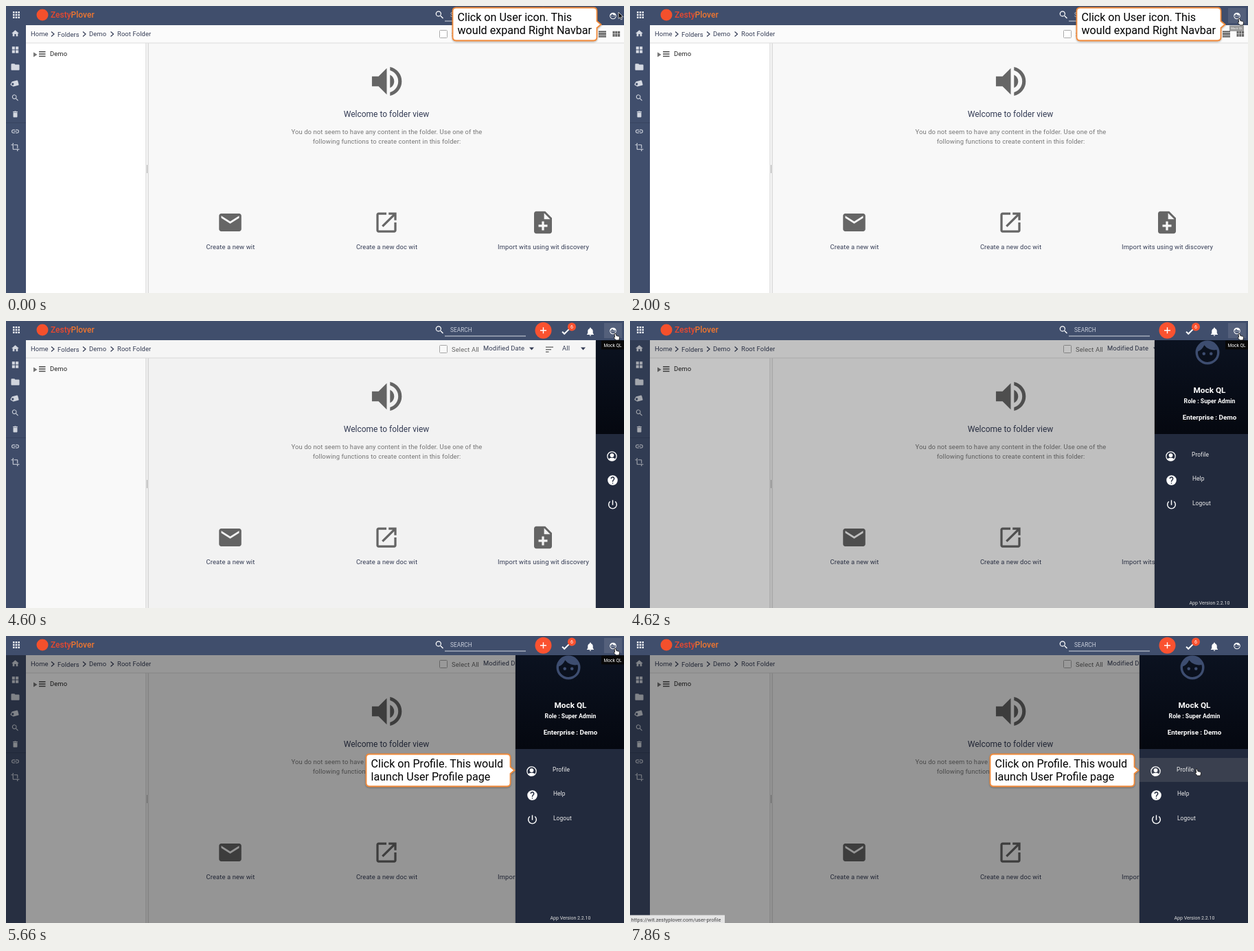
An HTML page that plays this animation: 900x419 px, repeating every 8000 ms.

```html
<!DOCTYPE html>
<html lang="en">
<head>
<meta charset="utf-8">
<title>Opening the user profile</title>
<style>
  html, body { margin: 0; width: 100%; height: 100%; overflow: hidden; background: #f8f8f8; }
  svg { display: block; width: 100%; height: 100%; font-family: Roboto, sans-serif; }
  .label { font-size: 9.4px; letter-spacing: .12px; }
  .mid { text-anchor: middle; }
  .callout { font-size: 16.1px; fill: #000; }
</style>
</head>
<body>
<svg id="stage" viewBox="0 0 900 419"></svg>
<script>
const LOOP = 8000, NAVY = '#404e6c', INK = '#343c55', GRAY = '#666';

// Icon outlines on a 24-unit grid
const ICONS = {
  apps: 'M4 4h4v4H4zm6 0h4v4h-4zm6 0h4v4h-4zM4 10h4v4H4zm6 0h4v4h-4zm6 0h4v4h-4zM4 16h4v4H4zm6 0h4v4h-4zm6 0h4v4h-4z',
  home: 'M10 20v-6h4v6h5v-8h3L12 3 2 12h3v8z',
  blocks: 'M3 3h8v8H3zm10 0h8v8h-8zM3 13h8v8H3zm10 0h8v8h-8z',
  folder: 'M10 4H4c-1.1 0-2 .9-2 2v12c0 1.1.9 2 2 2h16c1.1 0 2-.9 2-2V8c0-1.1-.9-2-2-2h-8z',
  tag: 'M21.4 11.6l-9-9C12 2.2 11.5 2 11 2H4c-1.1 0-2 .9-2 2v7c0 .5.2 1 .6 1.4l9 9c.8.8 2 .8 2.8 0l7-7c.8-.8.8-2 0-2.8zM7 10a3 3 0 1 1 0-6 3 3 0 0 1 0 6z',
  search: 'M15.5 14h-.8l-.3-.3A6.5 6.5 0 1 0 13.7 14.4l.3.3v.8l5 5 1.5-1.5zm-6 0a4.5 4.5 0 1 1 0-9 4.5 4.5 0 0 1 0 9z',
  trash: 'M6 19c0 1.1.9 2 2 2h8c1.1 0 2-.9 2-2V7H6zM19 4h-3.5l-1-1h-5l-1 1H5v2h14z',
  link: 'M3.9 12A3.1 3.1 0 0 1 7 8.9h4V7H7a5 5 0 0 0 0 10h4v-1.9H7A3.1 3.1 0 0 1 3.9 12zM8 13h8v-2H8zm9-6h-4v1.9h4a3.1 3.1 0 0 1 0 6.2h-4V17h4a5 5 0 0 0 0-10z',
  crop: 'M17 15h2V7c0-1.1-.9-2-2-2H9v2h8zM7 17V1H5v4H1v2h4v10c0 1.1.9 2 2 2h10v4h2v-4h4v-2z',
  speaker: 'M3 9v6h4l5 5V4L7 9zm13.5 3A4.5 4.5 0 0 0 14 8v8c1.5-.7 2.5-2.2 2.5-4zM14 3.2v2.1a7 7 0 0 1 0 13.4v2.1a9 9 0 0 0 0-17.6z',
  mail: 'M20 4H4c-1.1 0-2 .9-2 2v12c0 1.1.9 2 2 2h16c1.1 0 2-.9 2-2V6c0-1.1-.9-2-2-2zm0 4l-8 5-8-5V6l8 5 8-5z',
  open: 'M19 19H5V5h7V3H5c-1.1 0-2 .9-2 2v14c0 1.1.9 2 2 2h14c1.1 0 2-.9 2-2v-7h-2zM14 3v2h3.6l-9.8 9.8 1.4 1.4L19 6.4V10h2V3z',
  noteAdd: 'M14 2H6c-1.1 0-2 .9-2 2v16c0 1.1.9 2 2 2h12c1.1 0 2-.9 2-2V8zm2 14h-3v3h-2v-3H8v-2h3v-3h2v3h3zm-3-7V3.5L18.5 9z',
  bell: 'M12 22a2 2 0 0 0 2-2h-4c0 1.1.9 2 2 2zm6-6v-5c0-3.1-1.6-5.6-4.5-6.3V4a1.5 1.5 0 0 0-3 0v.7C7.6 5.4 6 7.9 6 11v5l-2 2v1h16v-1z',
  check: 'M9 15L5 11l-2.4 2.4L9 19.8 22 6.800l-2.400-2.400z',
  face: 'M9 11.700a1.300 1.300 0 1 0 0 2.600 1.300 1.300 0 0 0 0-2.600zm6 0a1.300 1.300 0 1 0 0 2.600 1.300 1.300 0 0 0 0-2.600zM12 2a10 10 0 1 0 0 20 10 10 0 0 0 0-20zm0 18a8 8 0 0 1-8-8.900 10 10 0 0 0 5.300-5.300A10 10 0 0 0 19.700 9.700 8 8 0 0 1 12 20z',
  person: 'M12 2a10 10 0 1 0 0 20 10 10 0 0 0 0-20zm0 1.800a8.200 8.200 0 0 1 6.200 13.500C16.500 15.500 14 15 12 15s-4.500.5-6.200 2.300A8.200 8.200 0 0 1 12 3.800zM12 6a4 4 0 1 1 0 8 4 4 0 0 1 0-8z',
  help: 'M12 2a10 10 0 1 0 0 20 10 10 0 0 0 0-20zm1 17h-2v-2h2zm2-7.700l-.9.900C13.400 12.900 13 13.500 13 15h-2v-.5c0-1.100.5-2.100 1.200-2.800l1.200-1.300A2 2 0 1 0 10 9H8a4 4 0 1 1 7 2.300z',
  power: 'M13 3h-2v10h2zm4.800 2.200l-1.400 1.400a7 7 0 1 1-8.800 0L6.200 5.200a9 9 0 1 0 11.600 0z',
  modules: 'M4 5h5v6H4zm6 0h5v6h-5zm6 0h5v6h-5zM4 12h5v6H4zm6 0h5v6h-5zm6 0h5v6h-5z'
};

const icon = (name, cx, cy, size, fill, turn = 0) =>
  `<path d="${ICONS[name]}" fill="${fill}" fill-rule="evenodd" transform="translate(${cx} ${cy}) rotate(${turn}) scale(${size / 24}) translate(-12 -12)"/>`;
const rect = (x, y, w, h, fill, extra = '') =>
  `<rect x="${x}" y="${y}" width="${w}" height="${h}" fill="${fill}" ${extra}/>`;
const text = (x, y, s, fill = INK, extra = 'class="label"') =>
  `<text x="${x}" y="${y}" fill="${fill}" ${extra}>${s}</text>`;
const centered = (x, y, s, size, fill, weight = 400) =>
  text(x, y, s, fill, `class="mid" font-size="${size}" font-weight="${weight}"`);
const bars = (x, y, w, count, gap, fill) =>
  Array.from({ length: count }, (_, i) => rect(x, y + i * gap, w, 1.6, fill)).join('');
const chevron = x => `<path d="M${x - 2} 37.500l4 3.500-4 3.500" fill="none" stroke="${INK}" stroke-width="1.200"/>`;
const dropArrow = x => `<path d="M${x} 38.500h7l-3.500 4z" fill="${INK}"/>`;

// Rounded box with a small tail on its right side
const callout = (id, x, y, w, h, tailY, lines) => `<g id="${id}">
  <path d="M${x + 5} ${y}h${w - 10}q5 0 5 5V${tailY - 5}l6 5-6 5V${y + h - 5}q0 5-5 5h${10 - w}q-5 0-5-5V${y + 5}q0-5 5-5z"
    fill="#fff" stroke="#f08a3a" stroke-width="1.800" filter="url(#shadow)"/>
  ${lines.map((s, i) => text(x + 7, y + 19.500 + i * 18.500, s, '#000', 'class="callout"')).join('')}</g>`;

const sidebar = [['home', 40, 13], ['blocks', 64, 12.5], ['folder', 89, 14.5], ['tag', 113, 13, -60],
  ['search', 134, 12.5], ['trash', 158, 12], ['link', 183, 13], ['crop', 206, 13]]
  .map(([name, y, size, turn]) => icon(name, 13.5, y, size, '#d5d9e2', turn)).join('');

const page = `
  ${rect(0, 0, 900, 419, '#f8f8f8')}
  ${rect(29, 28, 871, 26, '#fbfbfb')}${rect(29, 54, 175, 365, '#fff')}
  ${rect(203.500, 54, 4, 365, '#f1f1f1')}${rect(203, 54, 1, 365, '#e2e2e2')}${rect(207, 54, 1, 365, '#d8d8d8')}
  ${rect(29, 53.500, 871, 1, '#dedede')}${rect(205, 232, 1, 12, '#aaa')}
  ${rect(0, 28, 29, 391, NAVY)}${rect(0, 170, 29, 1, '#374460')}${sidebar}
  ${text(36, 43.500, 'Home')}${chevron(68)}${text(75, 44.500, 'Folders')}${chevron(114)}
  ${text(121, 43.500, 'Demo')}${chevron(154.500)}${text(162, 43.500, 'Root Folder')}
  ${rect(631.500, 35.500, 11, 11, '#fff', 'stroke="#aaa" rx="1"')}
  ${text(649, 44.500, 'Select All', '#666')}${text(695, 43, 'Modified Date')}${dropArrow(762)}
  ${rect(786, 37.500, 11, 1.300, GRAY)}${rect(786, 41, 8, 1.300, GRAY)}${rect(786, 44.500, 4.500, 1.300, GRAY)}
  ${text(810, 43, 'All')}${dropArrow(837)}
  ${bars(863, 36.500, 11, 4, 2.500, '#444')}${icon('modules', 888.500, 41, 15, GRAY)}
  <path d="M40 67.500l5.500 3.500-5.500 3.500z" fill="#777"/>${bars(48, 66, 9.500, 3, 3.300, '#555')}${text(64, 73, 'Demo', '#222')}
  ${icon('speaker', 554.500, 110, 57.500, GRAY)}
  ${centered(554, 161.500, 'Welcome to folder view', 12, INK)}
  ${text(554.500, 187, 'You do not seem to have any content in the folder. Use one of the', '#777', 'class="label mid"')}
  ${text(554.500, 201, 'following functions to create content in this folder:', '#777', 'class="label mid"')}
  ${[['mail', 326.500, 'Create a new wit'], ['open', 554, 'Create a new doc wit'], ['noteAdd', 782, 'Import wits using wit discovery']]
    .map(([name, x, s]) => icon(name, x, 316, 39, GRAY) + text(x + .5, 354.500, s, INK, 'class="label mid"')).join('')}`;

// Panel coordinates are relative to its left edge
const panel = `<g id="panel">
  ${rect(0, 28, 160, 391, '#242b3c', 'filter="url(#shadow)"')}${rect(0, 28, 160, 137, 'url(#night)')}
  ${rect(0, 178, 160, 35, '#3a404f', 'id="rowHover"')}
  ${icon('face', 77, 46, 42, '#3d4d70')}
  ${centered(80, 105, 'Mock QL', 11.800, '#fff', 700)}
  ${centered(80, 119.500, 'Role : Super Admin', 8.700, '#fff', 700)}
  ${centered(80, 144, 'Enterprise : Demo', 9.800, '#fff', 700)}
  ${[['person', 23.500, 197.500, 'Profile', 54], ['help', 24.500, 232.500, 'Help', 55], ['power', 24.500, 268, 'Logout', 55]]
    .map(([name, x, y, s, tx], i) => icon(name, x, y, 17.500, '#fff')
      + text(tx, 197.500 + i * 35.700, s, '#eee', 'font-size="8.400" letter-spacing=".1"')).join('')}
  ${centered(80, 414, 'App Version 2.2.10', 7, '#ddd')}</g>`;

const header = `
  ${rect(0, 0, 900, 28, NAVY)}${icon('apps', 15, 13, 15, '#eef0f4')}
  <circle cx="53" cy="13" r="8.500" fill="#f4502c"/>
  <text x="65" y="17" font-size="12" font-weight="500" fill="#e8482f">Zesty<tspan fill="#f0762f">Plover</tspan></text>
  ${icon('search', 631.500, 13, 15.500, '#fff')}${text(647, 15.500, 'SEARCH', '#c8cedb', 'font-size="8.400"')}
  ${rect(639, 21.500, 118, 1, '#d5d9e2')}
  <circle cx="782.500" cy="13.800" r="12" fill="#fa5230"/><path d="M778 13.800h9m-4.500-4.500v9" stroke="#fff" stroke-width="1.400"/>
  ${icon('check', 815, 15.500, 14.500, '#fff')}<circle cx="824" cy="8.500" r="6" fill="#fa5230"/>${centered(824, 11, '6', 7, '#fff')}
  ${icon('bell', 851, 15.500, 15, '#fff')}
  ${rect(871, 3, 26, 22, 'rgba(255,255,255,.1)', 'id="buttonHover"')}${icon('face', 884, 14.500, 11.500, '#fff')}`;

const stage = document.getElementById('stage');
stage.innerHTML = `
  <defs>
    <filter id="shadow" x="-10%" y="-20%" width="120%" height="150%"><feDropShadow dx="0" dy="1" stdDeviation="1.200" flood-opacity=".35"/></filter>
    <linearGradient id="night" x2="0" y2="1"><stop stop-color="#0b1220"/><stop offset="1" stop-color="#050810"/></linearGradient>
  </defs>
  ${page}${rect(0, 28, 900, 391, '#000', 'id="shade"')}${panel}${header}
  <g id="tooltip">${rect(-16.500, 0, 33, 13, '#080808', 'rx="1"')}${centered(0, 9, 'Mock QL', 6.600, '#fff')}</g>
  ${callout('userTip', 650.500, 2.500, 210, 48, 27, ['Click on User icon. This', 'would expand Right Navbar'])}
  ${callout('profileTip', 524.500, 172.500, 210, 47, 196, ['Click on Profile. This would', 'launch User Profile page'])}
  <g id="status">${rect(0, 407.500, 138, 12, '#e4e4e4')}${text(1.500, 417, 'https://wit.zestyplover.com/user-profile', '#444', 'font-size="7.500"')}</g>
  <g id="pointer" stroke-linejoin="round">
    <path id="arrow" d="M0 0v9.500l2.200-2 1.500 3.400 1.600-.7-1.500-3.300h3z" fill="#111" stroke="#fff" stroke-width=".7"/>
    <path id="hand" d="M-1 .6Q0-.8 1 .6L2 3.600 5.400 4.300Q6.600 4.800 6.500 6.500L5.800 10H1.500L-1.800 6.800Q-2 5.300-.4 5.700z" fill="#fff" stroke="#111" stroke-width=".9"/>
  </g>`;

const el = id => document.getElementById(id);
const show = (id, on) => el(id).setAttribute('visibility', on ? 'visible' : 'hidden');
const place = (id, value) => el(id).setAttribute('transform', value);
const progress = (t, from, to) => Math.min(1, Math.max(0, (t - from) / (to - from)));
const smooth = p => p * p * (3 - 2 * p);

function recordedTime(t) {
  if (t < 4600) return Math.floor(t / 200) * 200;
  if (t < 4660) return 4600 + Math.floor((t - 4600) / 20) * 20;
  return 4660 + Math.floor((t - 4660) / 200) * 200;
}

function draw(t) {
  const slide = t < 4600 ? -1 : Math.min(3, Math.round((t - 4600) / 20));
  show('panel', slide >= 0);
  place('panel', `translate(${[859, 764, 746, 742][slide] ?? 900} 0)`);
  el('shade').setAttribute('opacity', [.025, .23, .36, .4][slide] ?? 0);

  show('userTip', t < 4600);
  show('profileTip', t >= 4660);

  const onUser = t >= 1800 && t < 6260, onProfile = t >= 7460;
  show('buttonHover', onUser);
  show('rowHover', onProfile);
  show('status', t >= 7660);

  const opening = t < 2200;
  show('tooltip', t >= 2000 && t < 6460);
  place('tooltip', `translate(883.500 28.500) scale(${opening ? .64 : 1})`);
  el('tooltip').setAttribute('opacity', opening ? .4 : 1);

  const approach = smooth(progress(t, 200, 1800)), leave = smooth(progress(t, 6060, 7460));
  place('pointer', `translate(${892 - 5 * approach - 62 * leave} ${9 + 9 * approach + 176 * leave})`);
  show('hand', onUser || onProfile);
  show('arrow', !onUser && !onProfile);
}

function tick() {
  draw(recordedTime(performance.now() % LOOP));
  requestAnimationFrame(tick);
}
tick();
</script>
</body>
</html>
```
